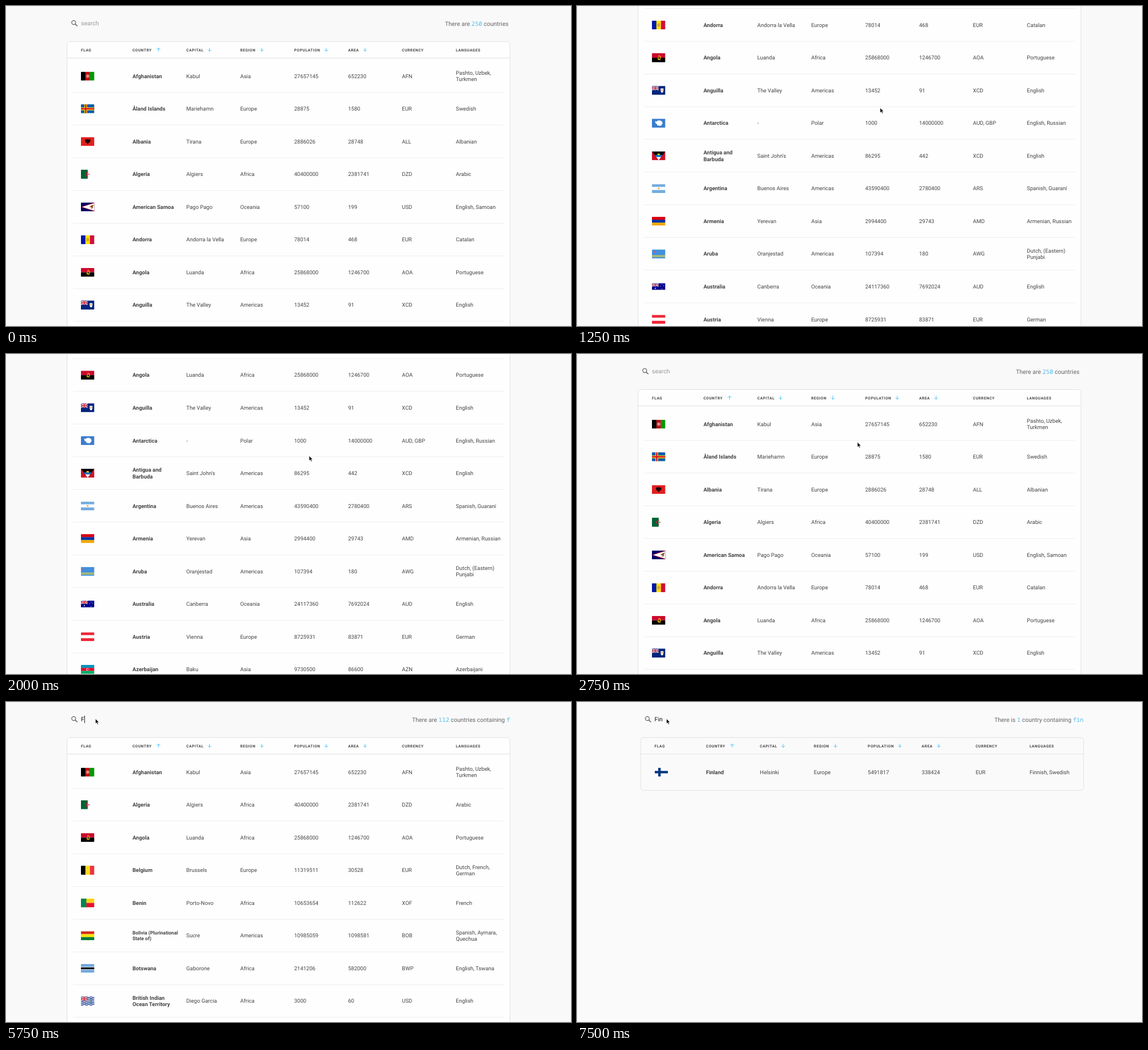
An HTML page for the animation above (8000 ms loop, 995 px wide and 563 px high).

```html
<!DOCTYPE html>
<html lang="en">
<head>
<meta charset="utf-8">
<title>Country table</title>
<style>
html, body { margin: 0; width: 100%; height: 100%; overflow: hidden; background: #faf9f9; }
svg { display: block; }
text { font: 9.5px Roboto, sans-serif; fill: #444; white-space: pre; text-rendering: geometricPrecision; }
.b { font-weight: 700; }
.small { font-size: 8.55px; }
.th { font-size: 6.6px; font-weight: 700; letter-spacing: .57px; }
.top { font-size: 10.5px; fill: #666; }
.hint { fill: #999; }
.typed { fill: #111; }
.n { font: 10.6px "Noto Sans Mono", monospace; fill: #4fbfee; }
</style>
</head>
<body>
<svg id="stage" width="995" height="563" viewBox="0 0 995 563"></svg>
<script>
const stage = document.getElementById('stage');
const LOOP = 8000, ROW = 57.53;
const COLS = [132, 222.7, 317.5, 412.5, 507.5, 602.5, 697.3, 792.3];

// Drawing helpers; flags use a 24 x 16 box
const rect = (x, y, w, h, c) => `<rect x="${x}" y="${y}" width="${w}" height="${h}" fill="${c}"/>`;
const disc = (x, y, r, c) => `<circle cx="${x}" cy="${y}" r="${r}" fill="${c}"/>`;
const path = (d, c) => `<path d="${d}" fill="${c}"/>`;
const line = (d, c, w) => `<path d="${d}" fill="none" stroke="${c}" stroke-width="${w}"/>`;
const text = (x, y, s, cls = '') => `<text x="${x}" y="${y}" class="${cls}">${s}</text>`;
const hor = (...cs) => cs.map((c, i) => rect(0, i * 16 / cs.length, 24, 16 / cs.length, c)).join('');
const ver = (...cs) => cs.map((c, i) => rect(i * 8, 0, 8, 16, c)).join('');
const fill = c => rect(0, 0, 24, 16, c);
const cross = (c, w) => line('M8.5 0V16M0 8H24', c, w);
const moon = (x, y, r, c, bg) => disc(x, y, r, c) + disc(x + r * .35, y, r * .78, bg);
const canton = (h = 8) => `<svg width="12" height="${h}" viewBox="0 0 12 8" preserveAspectRatio="none">` +
  rect(0, 0, 12, 8, '#00247d') + line('M0 0L12 8M12 0L0 8', '#fff', 1.7) + line('M0 0L12 8M12 0L0 8', '#cf142b', .6) +
  line('M6 0V8M0 4H12', '#fff', 2.7) + line('M6 0V8M0 4H12', '#cf142b', 1.5) + '</svg>';
const shield = (c1, c2) => path('M15.5 4.5h5v4q0 3-2.5 4q-2.500-1-2.500-4z', c1) + rect(16.6, 6.2, 2.8, 2.8, c2);

const FLAGS = {
  Afghanistan: ver('#000', '#be0a12', '#009a00') + '<circle cx="12" cy="8" r="2.6" fill="#d0453f" stroke="#f3d9d6" stroke-width=".7"/>' + rect(11, 7, 2, 2, '#f0cfcb'),
  'Åland Islands': fill('#0b5cab') + cross('#ffce00', 5) + cross('#d21034', 2.3),
  Albania: fill('#e41e20') + path('M12 4.500l1-1 1.500 1 2-.5.5 2-1 3.500-2 .5-2 3-2-3-2-.5-1-3.500.5-2 2 .5 1.500-1z', '#1c0505'),
  Algeria: fill('#fff') + rect(0, 0, 12, 16, '#006233') + path('M14.800 5.500A4 4 0 1 0 14.800 10.500A3.200 3.200 0 1 1 14.800 5.500', '#d21034') + disc(14, 8, 1.1, '#d21034'),
  'American Samoa': fill('#000066') + path('M0 8L24 0V16z', '#bd1021') + path('M2 8L24 1.200V14.800z', '#fff') + path('M15 8l4-3 4-1-2 4 1 1-4 3 1-3z', '#8a5a2a'),
  Andorra: ver('#0018a8', '#fedf00', '#d0103a') + rect(10, 5.5, 4, 5, '#d08b2c') + rect(11, 6.5, 2, 3, '#e3b64a'),
  Angola: hor('#cc092f', '#000') + line('M11.500 4.600A3.300 3.300 0 1 1 10.300 10.500M10 9L15.200 12', '#ffcb00', 1.1) + disc(12, 7.2, 1, '#ffcb00'),
  Anguilla: fill('#00247d') + canton() + shield('#fff', '#f0b04a'),
  Antarctica: fill('#3a7dce') + path('M5.500 4l2 1.500 3-2 4-.3 3.500 2 1 3-1.500 3-3 2-2-1-2.500.2-1-2.500-2.500-1.500z', '#fff'),
  'Antigua and\nBarbuda': fill('#ce1126') + path('M0 0H24L12 16z', '#000') + disc(12, 6.6, 2.6, '#fcd116') + path('M4.900 6.500H19.100L16.500 10H7.500z', '#0072c6') + path('M7.500 10H16.500L12 16z', '#fff'),
  Argentina: hor('#74acdf', '#fff', '#74acdf') + disc(12, 8, 1.5, '#eaa23a'),
  Armenia: hor('#d90012', '#0033a0', '#f2a800'),
  Aruba: fill('#418fde') + rect(0, 10.3, 24, 1.1, '#f5dd29') + rect(0, 12.5, 24, 1.1, '#f5dd29') + path('M4 1.500l.7 1.800 1.800.7-1.800.7-.7 1.800-.7-1.800-1.800-.7 1.800-.7z', '#d8546a'),
  Australia: `<g transform="translate(0 2)">${rect(0, 0, 24, 12, '#00008b')}${canton(6)}` +
    [[6, 9, 1], [18, 2, .6], [15.5, 5.3, .6], [20.5, 4.5, .6], [18, 10, .6]].map(s => disc(...s, '#fff')).join('') + '</g>',
  Austria: hor('#ed2939', '#fff', '#ed2939'),
  Azerbaijan: hor('#0092bc', '#e4002b', '#00ae65') + moon(11.5, 8, 2, '#fff', '#e4002b') + disc(14, 8, .8, '#fff'),
  Belgium: ver('#000', '#fdda24', '#ef3340'),
  Benin: hor('#fcd116', '#e8112d') + rect(0, 0, 9.6, 16, '#008751'),
  'Bolivia (Plurinational\nState of)': hor('#d52b1e', '#f9e300', '#007934'),
  Botswana: fill('#75aadb') + rect(0, 5.6, 24, 4.8, '#fff') + rect(0, 6.4, 24, 3.2, '#000'),
  'British Indian\nOcean Territory': fill('#fff') + [1, 4, 7, 10, 13, 16].map(y => line(`M0 ${y}q2-2 4 0t4 0 4 0 4 0 4 0 4 0`, '#1b3f94', 1.4)).join('') + canton() + rect(17.5, 4, 1.2, 8, '#4b7a3a'),
  Bulgaria: hor('#fff', '#00966e', '#d62612'),
  Fiji: fill('#68bfe5') + canton() + shield('#fff', '#ce1126'),
  Finland: fill('#fff') + line('M8.700 0V16M0 8H24', '#003580', 4.4),
  Palau: fill('#4aadd6') + disc(10.5, 8, 4.4, '#ffde00'),
  Philippines: hor('#0038a8', '#ce1126') + path('M0 0L13 8L0 16z', '#fff') + disc(4.5, 8, 1.6, '#fcd116')
};

const DATA = `Kabul|Asia|27657145|652230|AFN|Pashto, Uzbek,/Turkmen
Mariehamn|Europe|28875|1580|EUR|Swedish
Tirana|Europe|2886026|28748|ALL|Albanian
Algiers|Africa|40400000|2381741|DZD|Arabic
Pago Pago|Oceania|57100|199|USD|English, Samoan
Andorra la Vella|Europe|78014|468|EUR|Catalan
Luanda|Africa|25868000|1246700|AOA|Portuguese
The Valley|Americas|13452|91|XCD|English
-|Polar|1000|14000000|AUD, GBP|English, Russian
Saint John's|Americas|86295|442|XCD|English
Buenos Aires|Americas|43590400|2780400|ARS|Spanish, Guaraní
Yerevan|Asia|2994400|29743|AMD|Armenian, Russian
Oranjestad|Americas|107394|180|AWG|Dutch, (Eastern)/Punjabi
Canberra|Oceania|24117360|7692024|AUD|English
Vienna|Europe|8725931|83871|EUR|German
Baku|Asia|9730500|86600|AZN|Azerbaijani
Brussels|Europe|11319511|30528|EUR|Dutch, French,/German
Porto-Novo|Africa|10653654|112622|XOF|French
Sucre|Americas|10985059|1098581|BOB|Spanish, Aymara,/Quechua
Gaborone|Africa|2141206|582000|BWP|English, Tswana
Diego Garcia|Africa|3000|60|USD|English
Sofia|Europe|7153784|110879|BGN|Bulgarian
Suva|Oceania|867000|18272|FJD|English, Fijian,/Hindi, Urdu
Helsinki|Europe|5491817|338424|EUR|Finnish, Swedish
Ngerulmud|Oceania|17950|459|USD|English, Filipino
Manila|Asia|103279800|342353|PHP|English, Filipino`.split('\n');
const COUNTRIES = Object.keys(FLAGS).map((name, i) => [name, ...DATA[i].replace('/', '\n').split('|')]);
const TOTALS = { '': 250, f: 112 };
const COUNT_X = { '': 773, f: 715, fi: 726, fin: 735 };

// Each step: start time, pointer x, pointer y (x = 0 hides it), scroll, query, caret shown
const STEPS = [
  [0, 0, 0, 0, '', 0],
  [250, 517, 208, 0, '', 0],
  [500, 533.5, 179, 0, '', 0],
  [750, 533.5, 179, 194.7, '', 0],
  [1250, 533.5, 179, 377.6, '', 0],
  [1500, 533.5, 179, 460.2, '', 0],
  [1750, 533.5, 179, 433.5, '', 0],
  [2000, 533.5, 179, 431.4, '', 0],
  [2500, 533.5, 179, 0, '', 0],
  [2750, 493.5, 155, 0, '', 0],
  [3000, 161.5, 40, 0, '', 0],
  [3250, 158, 32, 0, '', 0],
  [3500, 157.5, 31, 0, '', 0],
  [3750, 0, 0, 0, '', 1],
  [4000, 157.2, 29.3, 0, '', 1],
  [4250, 157.2, 29.3, 0, '', 0],
  [4750, 157.2, 29.3, 0, '', 1],
  [5250, 157.2, 29.3, 0, '', 0],
  [5750, 157.2, 29.3, 0, 'F', 1],
  [6250, 157.2, 29.3, 0, 'Fi', 1],
  [6750, 157.2, 29.3, 0, 'Fi', 0],
  [7000, 157.2, 29.3, 0, 'Fin', 1],
  [7500, 157.2, 29.3, 0, 'Fin', 0]
];

function cell(x, y, value, cls) {
  const lines = value.split('\n'), gap = value.startsWith('Bolivia') ? 10 : 11.3;
  if (gap === 10) cls += ' small';
  return lines.map((s, i) => text(x, y + 3.3 + (i - (lines.length - 1) / 2) * gap, s, cls)).join('');
}

function row(country, i, rows) {
  const y = 123.4 + i * ROW;
  return `<svg x="132" y="${y - 7.9}" width="23.700" height="15.800" viewBox="0 0 24 16" preserveAspectRatio="none">` +
    `<g clip-path="inset(0 round 1px)">${FLAGS[country[0]]}</g></svg>` +
    country.map((v, c) => cell(COLS[c + 1], y, v, c ? '' : 'b')).join('') +
    (i < rows.length - 1 ? line(`M118 ${y + 28.6}H877`, '#eeeeee', 1) : '');
}

function header() {
  const names = ['FLAG', 'COUNTRY', 'CAPITAL', 'REGION', 'POPULATION', 'AREA', 'CURRENCY', 'LANGUAGES'];
  const arrows = [268.6, 358.5, 450.5, 564, 632.4];
  return names.map((s, i) => text(COLS[i], 79.7, s, 'th')).join('') +
    arrows.map((x, i) => `<g transform="translate(${x} 76.800) scale(1 ${i ? 1 : -1})">` +
      line('M0-3.200V2.800M-3.100 0L0 3.100L3.100 0', '#4fc3f7', 1) + '</g>').join('');
}

function counter(q, n) {
  const mono = s => `<tspan class="n">${s}</tspan>`;
  const one = n === 1;
  return `There ${one ? 'is' : 'are'} ${mono(n)} ${one ? 'country' : 'countries'}` + (q ? ` containing ${mono(q)}` : '');
}

function draw([, px, py, scroll, typed, caret]) {
  const q = typed.toLowerCase();
  const rows = COUNTRIES.filter(c => c.join(' ').toLowerCase().includes(q));
  const short = rows.length < 8, dx = short ? 4.6 : 0;
  const caretX = 132 + [0, 6, 8.5, 14.6][typed.length];
  stage.innerHTML = rect(0, 0, 995, 563, short ? '#fbfafa' : '#faf9f9') +
    `<g transform="translate(${dx} ${-scroll})">` +
    `<rect x="107.500" y="62.500" width="780" height="${35.4 + rows.length * ROW}" rx="5" fill="${short ? 'none' : '#fefefe'}" stroke="#e2e2e2"/>` +
    line('M108 91.500H887', '#e2e2e2', 1) + header() + rows.map(row).join('') +
    '<circle cx="119.200" cy="29.100" r="3.500" fill="none" stroke="#666" stroke-width="1.300"/>' + line('M121.700 31.600L125.700 35.500', '#666', 1.6) +
    text(132, 34.2, typed || 'search', 'top ' + (typed ? 'typed' : 'hint')) +
    (caret ? rect(caretX, 24, 1, 13, '#222') : '') + '</g>' +
    `<g transform="translate(0 ${-scroll})">${text(COUNT_X[q], 34.7, counter(q, TOTALS[q] || rows.length), 'top')}</g>` +
    (px ? `<path transform="translate(${px} ${py})" d="M.4.3V8.800L2.400 7L3.900 10.200L5.300 9.600L3.900 6.500H6.600z" fill="#000" stroke="#fff" stroke-width=".6"/>` : '');
}

let shown;
function tick(now) {
  const t = now % LOOP;
  const step = STEPS.findLast(s => s[0] <= t) || STEPS[0];
  if (step !== shown) draw(shown = step);
  requestAnimationFrame(tick);
}
tick(performance.now());
</script>
</body>
</html>
```
